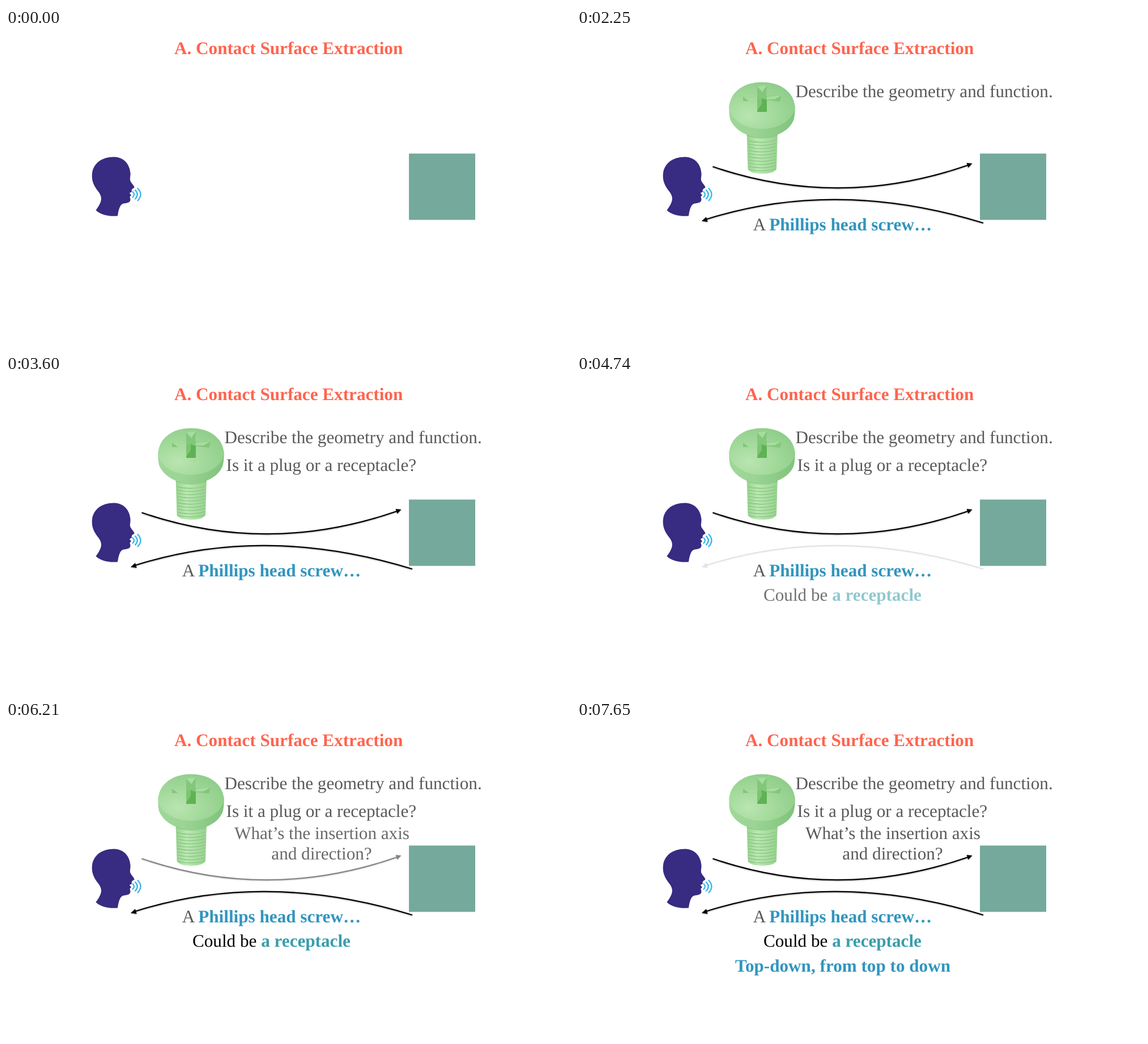
Animation, 997 px wide and 561 px high, one loop 8 s. Source, as an HTML page:

```html
<!DOCTYPE html>
<html lang="en">
<head>
<meta charset="utf-8">
<title>Contact Surface Extraction</title>
<style>
  html, body { margin: 0; width: 100%; height: 100%; overflow: hidden; background: #fff; }
  svg { display: block; width: 997px; height: 561px; }
  text { font: 31.16px "Liberation Serif", "Times New Roman", serif; fill: #595959; text-rendering: geometricPrecision; white-space: pre; }
  .bold { font-weight: bold; fill: #3195bf; }
  .arrow { filter: drop-shadow(0 1.5px 1px rgba(0, 0, 0, .35)); }
  .arrow .line { fill: none; stroke: #000; stroke-width: 2.3; }
</style>
</head>
<body>
<svg viewBox="0 0 997 561">
  <defs>
    <radialGradient id="dome" cx="0.3" cy="0.72" r="0.85">
      <stop offset="0" stop-color="#b9e5b1"/>
      <stop offset="0.45" stop-color="#a4da9c"/>
      <stop offset="1" stop-color="#8ccb87"/>
    </radialGradient>
    <linearGradient id="rim">
      <stop offset="0" stop-color="#a0d79a"/>
      <stop offset="0.4" stop-color="#9bd494"/>
      <stop offset="1" stop-color="#7fc37b"/>
    </linearGradient>
    <linearGradient id="shaft">
      <stop offset="0" stop-color="#98d290"/>
      <stop offset="0.35" stop-color="#bce8b4"/>
      <stop offset="1" stop-color="#97d18f"/>
    </linearGradient>
  </defs>

  <text class="bold" x="297" y="45.500" style="fill:#ff644e">A. Contact Surface Extraction</text>

  <path fill="#372b82" d="M190 227.500C167 227.500 151.700 241 151.700 261C151.700 274 158 282 164 290C170 299 170 306 158.500 321.500C166 329 180 333 197 331.500C199 319 201 311 208 309.500C215 308.500 219 308 219.500 303C219.700 300.500 218.500 299.500 218.500 297.500L221 295L218 291.500C219 289.500 222 290 222 288C221 285.500 222 284 226 282C228 280.500 223 276 220 271C217.500 266 220 263 219.500 256C218 238 206 227.500 190 227.500Z"/>
  <g fill="none" stroke="#36b4e5" stroke-width="2.200" stroke-linecap="round">
    <path d="M223.500 289Q228.500 293.500 223.500 298.500"/>
    <path d="M228 286Q235.500 293.500 228 301.500"/>
    <path d="M232.500 283Q242.500 293.500 232.500 304.500"/>
  </g>
  <rect x="711" y="221.500" width="117" height="117" fill="#74a99b"/>

  <g data-step="0">
    <path fill="url(#shaft)" d="M299.500 182H354L352 249Q347 257 326.500 257Q306 257 301.500 249Z"/>
    <path id="threads" fill="none" stroke="#86c77e" stroke-width="1.300"/>
    <path fill="#7fc379" opacity=".6" d="M299.500 187Q326 197 354 187V190Q326 200 299.500 190Z"/>
    <path fill="url(#rim)" d="M268.500 136C268 150 269 158 271 163C281 183 303 193 326 193C351 193 374 182 382 163C384 157 385 148 384.500 136Z"/>
    <path fill="url(#dome)" d="M268.500 138C271 112 295 95.500 326.500 95.500C358 95.500 382 112 384.500 138C384 161 357 178 326.500 178C295 178 269 161 268.500 138Z"/>
    <path fill="#83c77b" d="M318 103L335 101L334 120L361 119L358 130L335 127V148H318V128L293 129V121L318 124Z"/>
    <path fill="#a7dc9f" d="M293 121L318 124V128L304 129ZM335 121L361 119L348 126L335 126ZM318 103L335 101L327 113Z"/>
    <path fill="#60b254" d="M318 127L326 124L335 127V148H318Z"/>
    <path fill="#7cc572" d="M318 127L326 124V134L318 146Z"/>
    <text x="385.500" y="121.500">Describe the geometry and function.</text>
  </g>

  <g class="arrow" data-step="0" data-dips="2 4">
    <path class="line" d="M239.500 244.500Q462 321 690 242"/>
    <path d="M697.500 239L687.500 238L690.500 246.500Z"/>
  </g>
  <g class="arrow" data-step="1" data-dips="3 5">
    <path class="line" d="M717 344Q458 264.500 228 337.500"/>
    <path d="M220 340.500L228 333.300L230.700 341.900Z"/>
  </g>

  <text data-step="1" x="310.700" y="356.500">A <tspan class="bold">Phillips head screw…</tspan></text>
  <text data-step="2" x="388.500" y="170.500">Is it a plug or a receptacle?</text>
  <text data-step="3" x="329" y="400" style="fill:#000">Could be <tspan class="bold" style="fill:#389dab">a receptacle</tspan></text>
  <g data-step="4" text-anchor="middle">
    <text x="557.500" y="209.500">What’s the insertion axis</text>
    <text x="557" y="245.500">and direction?</text>
  </g>
  <text class="bold" data-step="5" x="279" y="443.500">Top-down, from top to down</text>
</svg>
<script>
  const LOOP = 8000;
  const starts = [0, 1800, 3150, 4500, 5850, 7200];
  const parts = [...document.querySelectorAll('[data-step]')].map(el => ({
    el,
    step: +el.dataset.step,
    dips: (el.dataset.dips || '').split(' ').filter(Boolean).map(Number)
  }));

  const progress = (t, step) =>
    Math.min(1, Math.max(0, (t - starts[step]) / (step ? 450 : 840)));
  const ease = p => p * p * (3 - 2 * p);

  let threads = '';
  for (let y = 199; y < 251; y += 5.6) threads += `M302 ${y}q25 6 49 -1`;
  document.getElementById('threads').setAttribute('d', threads);

  // An arrow already on stage blinks whenever its next line of text appears.
  function draw() {
    const t = performance.now() % LOOP;
    for (const { el, step, dips } of parts) {
      let alpha = ease(progress(t, step));
      for (const dip of dips) alpha *= 1 - 0.9 * Math.sin(Math.PI * progress(t, dip));
      el.style.opacity = alpha;
    }
    requestAnimationFrame(draw);
  }
  draw();
</script>
</body>
</html>
```
